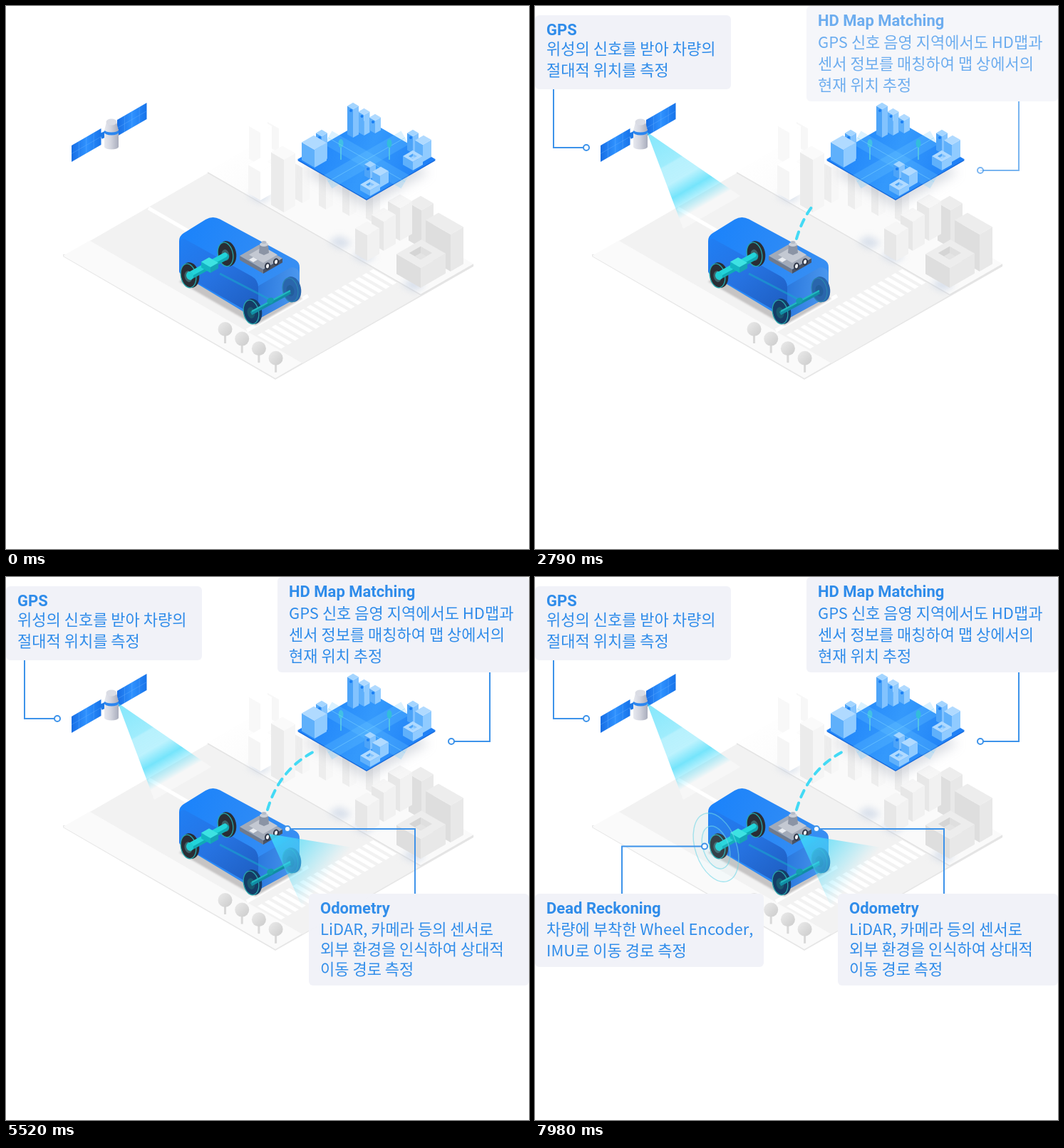
An HTML page with a canvas that plays this animation: 734 px wide and 763 px high, repeating every 8000 ms.

```html
<!DOCTYPE html>
<html lang="ko">
<head>
<meta charset="utf-8">
<title>Localization</title>
<style>
html, body { margin: 0; width: 100%; height: 100%; overflow: hidden; background: #fff; }
canvas { display: block; width: 734px; height: 763px; }
</style>
</head>
<body>
<canvas id="stage" width="734" height="763"></canvas>
<script>
const W = 734, H = 763, LOOP = 8000, PHASE = 2400, FADE = 810, SLOPE = 0.577;
const view = document.getElementById('stage').getContext('2d');
const still = document.createElement('canvas');
still.width = W;
still.height = H;
let c = still.getContext('2d');

const cyan = a => `rgba(64,218,250,${a})`;
const grays = l => [0, 10, 15].map(d => `rgb(${l + d},${l + d},${l + d})`);

function poly(fill, ...p) {
  c.beginPath();
  for (let i = 0; i < p.length; i += 2) c.lineTo(p[i], p[i + 1]);
  c.closePath();
  c.fillStyle = fill;
  c.fill();
}

function line(color, width, ...p) {
  c.beginPath();
  for (let i = 0; i < p.length; i += 2) c.lineTo(p[i], p[i + 1]);
  c.strokeStyle = color;
  c.lineWidth = width;
  c.stroke();
}

function oval(x, y, rx, ry, turn, fill, stroke, width = 1) {
  c.beginPath();
  c.ellipse(x, y, rx, ry, turn, 0, Math.PI * 2);
  if (fill) { c.fillStyle = fill; c.fill(); }
  if (stroke) { c.strokeStyle = stroke; c.lineWidth = width; c.stroke(); }
}

function ramp(x0, y0, x1, y1, ...stops) {
  const g = c.createLinearGradient(x0, y0, x1, y1);
  for (let i = 0; i < stops.length; i += 2) g.addColorStop(stops[i], stops[i + 1]);
  return g;
}

function layer(set, draw) {
  c.save();
  Object.assign(c, set);
  draw();
  c.restore();
}

// Isometric rhombus standing on its near corner, a to the left and b to the right.
const rhomb = (fill, x, y, a, b = a) =>
  poly(fill, x, y, x - a, y - a * SLOPE, x - a + b, y - (a + b) * SLOPE, x + b, y - b * SLOPE);

function prism(x, y, a, b, h, [left, right, top]) {
  const da = a * SLOPE, db = b * SLOPE;
  poly(left, x, y, x - a, y - da, x - a, y - da - h, x, y - h);
  poly(right, x, y, x + b, y - db, x + b, y - db - h, x, y - h);
  rhomb(top, x, y - h, a, b);
}

function well(x, y, r, [dark, light, floor]) {
  const k = r * SLOPE;
  rhomb(light, x, y + k, r);
  poly(dark, x - r, y, x, y - k, x, y + k);
  rhomb(floor, x, y + k, r / 2);
}

function ground() {
  poly('#e6e6e6', 80, 349, 80, 352, 378, 525, 656, 366, 656, 362);
  rhomb('#fafafa', 378, 523, 298, 38);
  rhomb('#f2f2f2', 416, 502, 298, 166);
  rhomb(ramp(330, 185, 430, 330, 0, '#ffffff', 0.6, '#fafafa'), 582, 405, 299, 74);
  line('#e4e4e4', 1.5, 283, 234, 582, 406, 656, 364);
  line('#ffffff', 5, 200, 284, 290, 336);
  line('#ffffff', 5, 338, 456, 424, 407);
  for (let i = 0; i < 17; i++) rhomb('#ffffff', 386 + i * 9.8, 481.5 - i * 5.6, 33, 5.5);
}

function city() {
  for (const x of [357, 470, 503, 573])
    layer({ filter: 'blur(5px)' }, () => rhomb('rgba(185,200,222,.5)', x, 71 + x * SLOPE, 18, 16));
  for (const i of [1, 0]) prism(357 + i * 26, 224 - i * 18, 16, 16, 46 - i * 12, grays(248 - i));
  prism(357, 273, 17, 17, 40, grays(245));
  prism(390, 290, 18, 16, 74, grays(235));
  for (let i = 0; i < 4; i++) prism(416 + i * 33, 277 + i * 9, 10, 10, 50, grays(237));
  prism(583, 340, 18, 17, 53, grays(222));
  for (const j of [2, 1, 0]) prism(507 + j * 23, 358 - j * 14, 17, 17, 36 + j * 5, grays(231));
  prism(624, 373, 35, 18, 52, grays(222));
  prism(582, 396, 34, 35, 28, grays(222));
  well(582, 347, 16, grays(213));
}

function trees() {
  for (let i = 0; i < 4; i++) {
    const x = 307.5 + i * 23.7, y = 454 + i * 13.6;
    line('#d8d8d8', 3, x, y + 8, x, y + 20);
    oval(x, y, 10, 10, 0, ramp(x - 8, y - 8, x + 8, y + 8, 0, '#e8e8e8', 1, '#cecece'));
  }
}

function map() {
  const ice = ['#5fb0fb', '#90cbff', '#b0daff'], sky = ['#4da4f8', '#83c3fe', '#a4d5ff'];
  const tower = (x, y, h, look = sky) => {
    prism(x, y, 8, 8, h, look);
    oval(x - 3, y - h + 2, 2, 2, 0, '#187ef4');
  };
  const cluster = (x, y, h) => {
    tower(x - 3, y - 14, h);
    prism(x + 11, y - 2, 11, 12, h, ice);
    prism(x - 3, y + 10, 14, 14, h * 0.5, ice);
    well(x - 3, y + 2 - h * 0.5, 6, sky);
  };
  layer({ filter: 'blur(8px)' }, () => rhomb('rgba(130,140,160,.3)', 507, 283, 86));
  rhomb('#1468dc', 506, 273, 97);
  rhomb(ramp(430, 190, 580, 250, 0, '#1f84fa', 0.5, '#3499fc', 1, '#1f80f6'), 506, 271.5, 97);
  for (const s of [-1, 1]) {
    const road = [506 - s * 54, 185, 506 + s * 54, 247];
    line('rgba(110,200,255,.25)', 22, ...road);
    line('rgba(130,215,255,.5)', 1, ...road);
    const x = 504 + s * 34;
    line('#5bd0e0', 1.5, x, 216, x, 192);
    oval(x, 193, 3.5, 6, 0, '#33bddb');
  }
  for (const i of [1, 2, 0]) tower(487 + i * 15.5, 185 - i * 3, 40 - i * 11, i ? ice : sky);
  tower(443, 219, 36);
  prism(433, 227, 18, 17, 25, ice);
  cluster(574, 221, 24);
  cluster(514, 257, 16);
}

function satellite() {
  const metal = ramp(137, 0, 159, 0, 0, '#e9ebf1', 0.45, '#d3d5df', 1, '#a5a9b9');
  for (const [x, y] of [[156, 160], [92, 196]]) {
    const w = 41.5, h = 23, up = w * SLOPE;
    poly(ramp(x, y, x + w, y + h - up, 0, '#176ee5', 0.5, '#2f92ff', 1, '#1874ea'),
      x, y, x + w, y - up, x + w, y + h - up, x, y + h);
    for (let i = 1; i < 4; i++) {
      const k = i / 4;
      line('rgba(110,180,255,.45)', 0.8, x + w * k, y - up * k, x + w * k, y - up * k + h);
    }
    line('rgba(110,180,255,.45)', 0.8, x, y + h / 2, x + w, y + h / 2 - up);
  }
  line('#1b78e8', 8, 133, 183, 144, 178);
  poly(metal, 138, 176, 158, 176, 158, 198, 138, 198);
  oval(148, 198, 10, 3.5, 0, metal);
  oval(148, 177, 10.5, 4.5, 0, '#2b86ef');
  poly(metal, 141, 163, 155, 163, 158, 175, 138, 175);
  oval(148, 174, 10, 3.5, 0, metal);
  oval(148, 163, 7.5, 4.5, 0, '#dadce4');
}

function rounded(fill, r, ...p) {
  const n = p.length;
  c.beginPath();
  c.moveTo((p[0] + p[n - 2]) / 2, (p[1] + p[n - 1]) / 2);
  for (let i = 0; i < n; i += 2) c.arcTo(p[i], p[i + 1], p[(i + 2) % n], p[(i + 3) % n], r[i / 2]);
  c.closePath();
  c.fillStyle = fill;
  c.fill();
}

function wheel(x, y, fill, rim, hub) {
  oval(x + 2, y - 1, 12, 18, -0.2, fill);
  oval(x - 1, y, 10.5, 17, -0.2, fill, rim, 1.3);
  oval(x - 1, y + 1, 5.4, 8, -0.2, hub);
}

function car() {
  layer({ filter: 'blur(1px)' }, () => rhomb('#c6c4c4', 350, 449, 107, 66));
  rounded(ramp(250, 310, 410, 380, 0, '#1b83fb', 1, '#398ff2'), [13, 20, 12, 5, 8, 5],
    243, 323, 290, 294, 412, 360, 412, 408, 352, 441, 243, 375);
  rounded(ramp(354, 385, 412, 390, 0, '#2a78de', 1, '#4c98ee'), [5, 10, 4, 3],
    353, 394, 412, 360, 412, 408, 352, 441);
  rounded(ramp(243, 315, 345, 435, 0, '#1f80f6', 0.5, '#2673e2', 1, '#1e5dc0'), [6, 18, 4, 4],
    243, 323, 354, 385, 354, 438, 243, 374);
  line('rgba(25,170,205,.55)', 3, 300, 376, 373, 414);

  for (const [x, y] of [[309, 349], [257, 379]]) wheel(x, y, '#2a2d34', '#25a6ab', '#3c6268');
  layer({ lineCap: 'round' }, () => {
    line('#10aab7', 10, 259, 379, 308, 352);
    line('#22d4d9', 7, 258, 377, 307, 350);
  });
  prism(287, 375, 13, 11, 8, ['#13b4c2', '#15a3b7', '#3de2e2']);
  oval(258, 379, 5, 6, -0.2, '#20cbd1');

  wheel(400, 399, '#2a66ac', '#2a84b0', '#225e9c');
  wheel(345, 430, '#153c66', '#27a4ab', '#17596f');
  line('#118da4', 5, 344, 432, 399, 402);
  line('#20b9bf', 2, 345, 429, 399, 400);
  oval(371, 414, 5, 4, -0.5, '#159eae');
  sensor();
}

function sensor() {
  prism(361, 376, 33, 27, 6, ['#707a8c', '#4a5365', '#a2aab8']);
  rhomb('#c3c8d2', 361, 361, 20);
  rhomb('#e8ebf0', 347, 360, 6);
  poly('#8b94a5', 356, 336, 368, 336, 369, 347, 362, 350, 355, 347);
  oval(362, 335, 6, 3, 0, '#cbd0d9');
  oval(362, 332, 3.5, 2, 0, '#b4bbc8');
  for (const x of [367, 379]) {
    oval(x, 549 - x / 2, 4, 5, 0.2, '#30384a');
    oval(x, 549 - x / 2, 2, 3, 0.2, '#eef1f5');
  }
}

function beam() {
  poly(ramp(158, 178, 225.5, 295, 0, cyan(0.65), 0.38, cyan(0.5), 0.4, cyan(0.38), 0.58, cyan(0.35),
    0.72, cyan(0.72), 0.84, cyan(0.35), 0.95, 'rgba(255,255,255,.4)'), 157, 177, 288, 267, 208, 313);
}

function cone() {
  poly(ramp(370, 362, 448, 426, 0, cyan(0.9), 0.45, cyan(0.55), 0.9, cyan(0.08), 1, cyan(0)),
    369, 361, 492, 381, 425, 484);
}

function strokeArc(from, to) {
  const bend = (a, b, d, u) => (1 - u) ** 2 * a + 2 * (1 - u) * u * b + u * u * d;
  c.beginPath();
  for (let i = 0; i <= 30; i++) {
    const u = from + (to - from) * i / 30;
    c.lineTo(bend(367, 384, 437, u), bend(327, 268, 243, u));
  }
  c.stroke();
}

// Dashes run up to the map, leave a pale trail, then return.
function link(u) {
  const out = u > FADE && u < 2 * FADE ? u / FADE - 1 : 0;
  const tail = out * 0.8;
  c.lineWidth = 4;
  c.lineCap = 'round';
  if (out) {
    c.strokeStyle = ramp(367, 327, 400, 272, 0, 'rgba(205,243,250,.6)', 1, cyan(0.85));
    strokeArc(0, tail);
  }
  if (u >= 2 * FADE) c.globalAlpha = pulse(u);
  c.setLineDash([10, 9]);
  c.lineDashOffset = -out * 6;
  c.strokeStyle = '#43daf5';
  strokeArc(tail, Math.min(1, u / FADE));
}

function rings() {
  for (const k of [1, 0.62])
    oval(254, 380, 29 * k, 50 * k, -0.33, 'rgba(130,226,240,.05)', 'rgba(110,215,232,.6)', 1.4);
}

// wire: x of the upright, then the centre of the end dot
const cards = [
  { box: [0, 13, 275, 104], wire: [26, 72, 199], lead: 27, gap: 30, effect: u => glow(u, beam),
    title: 'GPS', lines: ['위성의 신호를 받아 차량의', '절대적 위치를 측정'] },
  { box: [381, 0, 353, 134], wire: [679, 625, 231], lead: 31, gap: 30, effect: link,
    title: 'HD Map Matching', lines: ['GPS 신호 음영 지역에서도 HD맵과', '센서 정보를 매칭하여 맵 상에서의', '현재 위치 추정'] },
  { box: [425, 445, 309, 129], wire: [574, 395, 354], lead: 30, gap: 28, effect: u => glow(u, cone),
    title: 'Odometry', lines: ['LiDAR, 카메라 등의 센서로', '외부 환경을 인식하여 상대적', '이동 경로 측정'] },
  { box: [0, 445, 321, 103], wire: [122, 238, 378.5], lead: 30, gap: 30, effect: u => glow(u, rings),
    title: 'Dead Reckoning', lines: ['차량에 부착한 Wheel Encoder,', 'IMU로 이동 경로 측정'] }
];

function drawCard({ box, wire: [wx, dx, dy], lead, gap, title, lines }) {
  const [x, y, , h] = box, left = x + 16, base = y + 28;
  line('#3d93ea', 2, wx, y > dy ? y : y + h, wx, dy, dx, dy);
  oval(dx, dy, 4, 4, 0, '#ffffff', '#3d93ea', 2);
  c.beginPath();
  c.roundRect(...box, 6);
  c.fillStyle = '#f1f2f8';
  c.fill();
  c.fillStyle = '#2f8cea';
  c.font = '700 22px Roboto, sans-serif';
  c.fillText(title, left, base);
  c.font = '400 22px "Noto Sans CJK KR", "Noto Sans KR", "Noto Sans CJK", sans-serif';
  lines.forEach((text, i) => c.fillText(text, left, base + lead + gap * i));
}

const ease = u => Math.sin(Math.min(1, u / FADE) * Math.PI / 2);

// Fade in, fade out, then come back quickly and stay.
function pulse(u) {
  if (u < FADE) return ease(u);
  if (u < 2 * FADE) return 1 - ease(u - FADE);
  return Math.min(1, (u - 2 * FADE) / 180);
}

const glow = (u, draw) => layer({ globalAlpha: pulse(u) }, draw);

function render(t) {
  c = view;
  c.clearRect(0, 0, W, H);
  c.drawImage(still, 0, 0);
  const shown = cards.map((card, i) => [card, t - i * PHASE]).filter(([, u]) => u > 0);
  for (const [card, u] of shown) layer({}, () => card.effect(u));
  for (const [card, u] of shown) layer({ globalAlpha: ease(u) }, () => drawCard(card));
}

[ground, city, map, satellite, trees, car].forEach(draw => draw());

const begin = performance.now();
function tick() {
  const t = (performance.now() - begin) % LOOP;
  render(Math.floor(t / 30) * 30);
  requestAnimationFrame(tick);
}
tick();
</script>
</body>
</html>
```
